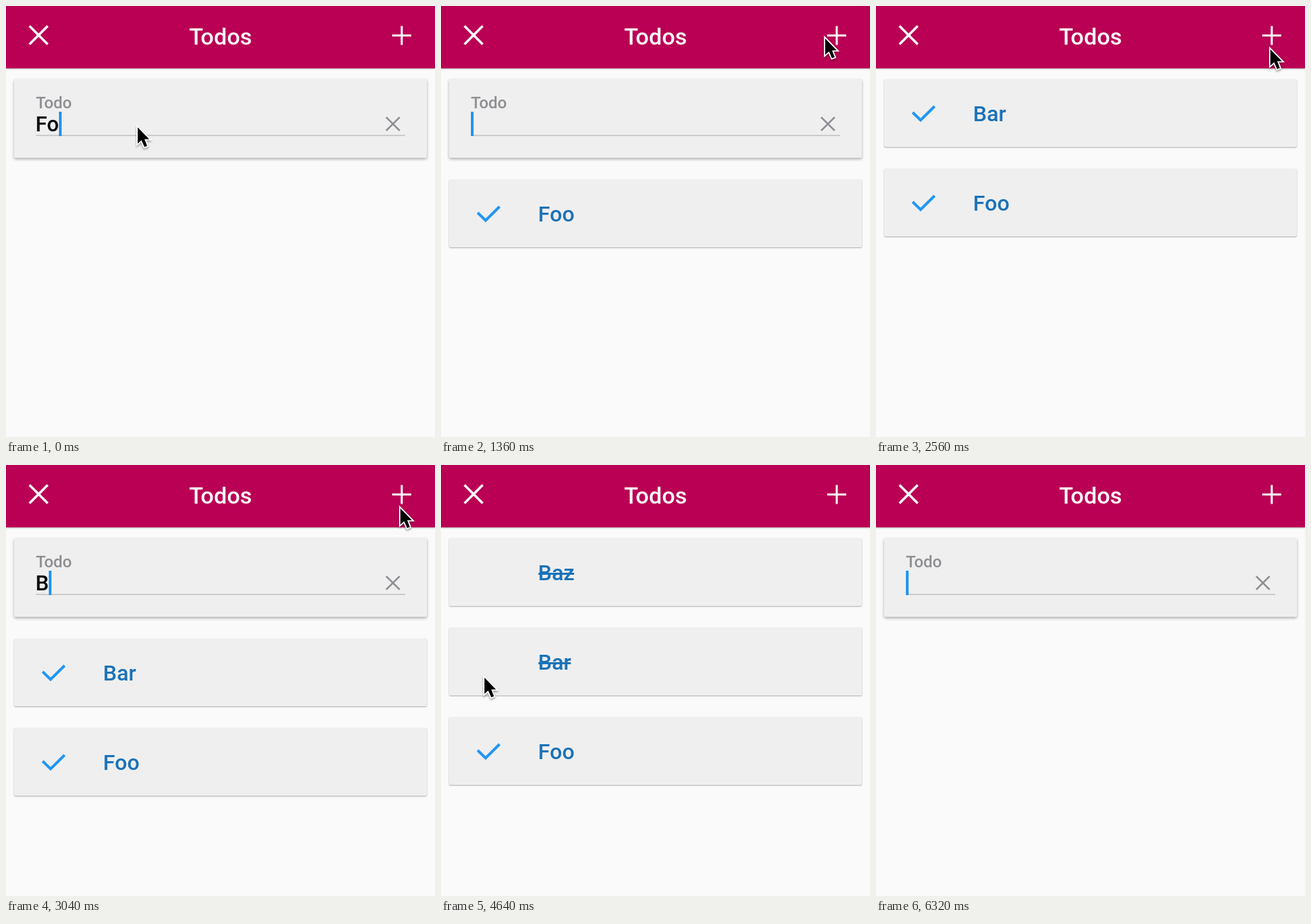
Recreate the animation shown at these times as an HTML page with a canvas. Size 632 by 636 pixels, loop 6.4 s.

```html
<!DOCTYPE html>
<html lang="en">
<head>
<meta charset="utf-8">
<title>Todos</title>
<style>
  html, body { margin: 0; width: 100%; height: 100%; overflow: hidden; background: #fafafa; }
  canvas { display: block; width: 632px; height: 636px; }
</style>
</head>
<body>
<canvas id="stage" width="632" height="636"></canvas>
<script>
const ctx = document.getElementById('stage').getContext('2d');
const LOOP = 6400, STEP = 80, GLIDE = 400;
const FONT = 'Roboto, "Noto Sans", sans-serif';
const PINK = '#ba0054', BLUE = '#2196f3', LINK = '#1a72b8', GREY = '#8e8e93';
const CLOSE = { x: 48, y: 43 }, PLUS = { x: 583, y: 43.5 };
const TOP = 108, ROW = 132, FIELD_SHIFT = 148;
const CLEARED = 5760, REOPENED = 5840, POINTER_HIDDEN = 6080;

// Newest first: field opens, typing starts, item is added
const todos = [
  { word: 'Baz', open: 2720, type: 3040, add: 3520 },
  { word: 'Bar', open: 1120, type: 1600, add: 2080 },
  { word: 'Foo', open: REOPENED - LOOP, type: -STEP, add: 240 }
];
const blank = { word: '', open: REOPENED, type: LOOP, add: LOOP };
const doneTime = row => 4160 + 400 * row;

// The pointer rests at each stop until the next glide begins
const checkStop = row => ({ x: 64, y: TOP + 60 + ROW * row });
const stops = [
  { at: -GLIDE, x: 194, y: 179 },
  { at: 560, x: 566, y: 48 },
  { at: 1520, x: 432, y: 174 },
  { at: 2160, x: 581, y: 64 },
  ...todos.map((_, row) => ({ at: doneTime(row) - GLIDE, ...checkStop(row) })),
  { at: 5200, x: 51, y: 48 }
];
const presses = [
  { at: 1040, icon: PLUS }, { at: 2640, icon: PLUS }, { at: 5680, icon: CLOSE }
];

const ease = p => p * p * (3 - 2 * p);
const clamp = p => Math.min(1, Math.max(0, p));

function polyline(points, color, width) {
  ctx.beginPath();
  points.forEach(([x, y]) => ctx.lineTo(x, y));
  ctx.strokeStyle = color;
  ctx.lineWidth = width;
  ctx.stroke();
}

function cross({ x, y }, r, color, width, turn = 0) {
  for (const angle of [turn, turn + Math.PI / 2]) {
    const dx = r * Math.cos(angle), dy = r * Math.sin(angle);
    polyline([[x - dx, y - dy], [x + dx, y + dy]], color, width);
  }
}

function label(text, x, y, size, color, align = 'left') {
  ctx.font = `500 ${size}px ${FONT}`;
  ctx.textAlign = align;
  ctx.fillStyle = color;
  ctx.fillText(text, x, y);
  return ctx.measureText(text).width;
}

function shadowed(color, alpha, offset, blur, paint) {
  ctx.save();
  ctx.shadowColor = `rgba(0,0,0,${alpha})`;
  ctx.shadowOffsetY = offset;
  ctx.shadowBlur = blur;
  ctx.fillStyle = color;
  paint();
  ctx.restore();
}

function card(y, height, offset, blur) {
  shadowed('#efefef', 0.32, offset, blur, () => {
    ctx.beginPath();
    ctx.roundRect(12, y, 608, height, 2);
    ctx.fill();
  });
}

function drawHeader(t) {
  shadowed(PINK, 0.3, 1, 2, () => ctx.fillRect(0, 0, 632, 92));
  for (const { at, icon } of presses) {
    const p = clamp((t - at) / 320);
    ctx.fillStyle = `rgba(255,255,255,${0.08 * Math.sin(Math.PI * p)})`;
    ctx.beginPath();
    ctx.arc(icon.x, icon.y, 18 + 23 * p, 0, 2 * Math.PI);
    ctx.fill();
  }
  cross(CLOSE, 19, '#fff', 3.5, Math.PI / 4);
  cross(PLUS, 14, '#fff', 3);
  label('Todos', 316, 56.5, 34, '#fff', 'center');
}

function drawField({ word, open, type }, t) {
  card(TOP, 116, 2, 4);
  label('Todo', 44, 151, 24, GREY);
  ctx.fillStyle = '#cbcbcb';
  ctx.fillRect(44, 190, 544, 2);
  const typed = Math.max(0, Math.floor((t - type) / STEP) + 1);
  const width = label(word.slice(0, typed), 43.5, 185, 31, '#000');
  const blinkedOff = t < type && (t - open) % 480 >= 320;
  if (!blinkedOff) {
    ctx.fillStyle = BLUE;
    ctx.fillRect(Math.round(43.5 + width), 156, 4, 36);
  }
  cross({ x: 570, y: 174 }, 14, GREY, 2.7, Math.PI / 4);
}

function drawTodo(word, done, y) {
  card(y, 100, 1, 2);
  const width = label(word, 143, y + 61.5, 32, LINK);
  if (done) {
    ctx.fillRect(143.5, y + 51, width - 1, 3);
  } else {
    polyline([[54, y + 49], [65.7, y + 60.5], [86.3, y + 40]], BLUE, 4);
  }
}

function pointerAt(t) {
  return stops.reduce((from, to) => {
    const p = ease(clamp((t - to.at) / GLIDE));
    return { x: from.x + (to.x - from.x) * p, y: from.y + (to.y - from.y) * p };
  });
}

function drawPointer(t) {
  if (t >= POINTER_HIDDEN) return;
  const { x, y } = pointerAt(t);
  const shape = new Path2D('M0 0V24L5.5 19L10 29L14 27.5L10 17.5H17Z');
  ctx.save();
  ctx.translate(x, y);
  ctx.lineWidth = 3.6;
  ctx.strokeStyle = '#fff';
  shadowed('#000', 0.35, 2, 3, () => ctx.stroke(shape));
  ctx.fillStyle = '#000';
  ctx.fill(shape);
  ctx.restore();
}

function draw(t) {
  ctx.fillStyle = '#fafafa';
  ctx.fillRect(0, 0, 632, 636);
  drawHeader(t);
  const editing = [...todos, blank].find(({ open, add }) => t >= open && t < add);
  if (editing) drawField(editing, t);

  const listTop = TOP + (editing ? FIELD_SHIFT : 0);
  const listed = todos.filter(({ add }) => t >= add && t < CLEARED);
  listed.forEach(({ word }, row) =>
    drawTodo(word, t >= doneTime(row), listTop + ROW * row));
  drawPointer(t);
}

const start = performance.now();
function tick() {
  const t = (performance.now() - start) % LOOP;
  draw(Math.floor(t / STEP) * STEP);
  requestAnimationFrame(tick);
}
tick();
</script>
</body>
</html>
```
